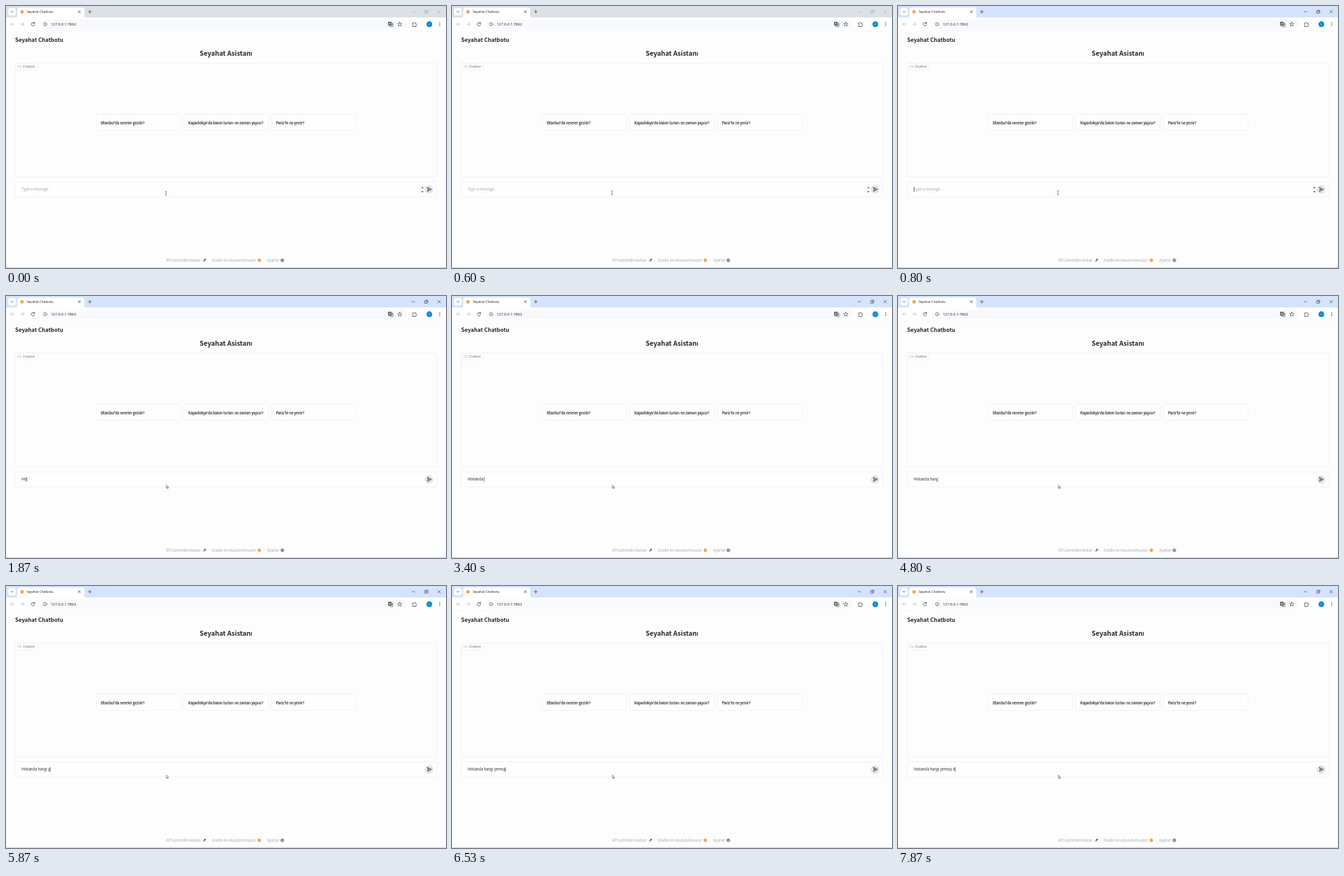
Write an HTML page that moves like this. It is 700 px wide and 416 px high and loops after 8000 ms.

```html
<!DOCTYPE html>
<html lang="tr">
<head>
<meta charset="utf-8">
<title>Seyahat Chatbotu</title>
<style>
  html, body { margin: 0; width: 100%; height: 100%; overflow: hidden; background: #fdfdfe; }
  svg { display: block; width: 700px; height: 416px; }
  text { font-family: "Noto Sans CJK JP", "Noto Sans CJK SC", "Open Sans", sans-serif; font-size: 5.73px; fill: #27272a; }
  .ui { font-family: "Open Sans", "Noto Sans", sans-serif; fill: #1f1f1f; }
  .bold { font-weight: 600; }
  .medium { stroke: #27272a; stroke-width: .16; }
  .soft { fill: #a6a6ae; }
  .box { fill: #fefefe; stroke: #efeff1; stroke-width: .8; }
  .line { fill: none; stroke: #3c4043; stroke-width: .8; stroke-linecap: round; stroke-linejoin: round; }
</style>
</head>
<body>
<svg viewBox="0 0 700 416" xmlns="http://www.w3.org/2000/svg">
  <rect width="700" height="416" fill="#fdfdfe"/>

  <!-- tab strip -->
  <rect id="strip" width="700" height="18.6"/>
  <rect x="3.5" y="3" width="12" height="12" rx="3.5" fill="#fff" fill-opacity=".92"/>
  <path class="line" d="M7.8 8.3l1.8 1.8 1.8-1.8"/>
  <path d="M14.5 18.6q3.5 0 3.5-3.5V6q0-3.5 3.5-3.5H121q3.5 0 3.5 3.5v9q0 3.5 3.5 3.5z" fill="#fff"/>
  <circle cx="25.5" cy="9.2" r="2.7" fill="#f7a545"/>
  <text class="ui" x="33" y="11.1" style="font-size:5.15px">Seyahat Chatbotu</text>
  <path class="line" d="M114.9 7.3l3.6 3.6m0-3.6l-3.6 3.6M130.9 9.1h4.8m-2.4-2.4v4.8"/>
  <g id="controls" class="line" style="stroke-width:.6">
    <path d="M646 9.1h4.2M686.9 6.9l4.4 4.4m0-4.4l-4.4 4.4"/>
    <path d="M666.3 7.9h3.6v3.6h-3.6zM667.5 7.8v-1.1h3.6v3.6h-1.1"/>
  </g>

  <!-- toolbar -->
  <rect y="18.4" width="700" height="20.8" fill="#fff"/>
  <rect x="54" y="21.6" width="584" height="14.6" rx="7.3" fill="#f8f9fc"/>
  <path class="line" d="M13.2 28.9H7.6m2.6-2.6l-2.6 2.6 2.6 2.6M23.2 28.9h5.6m-2.6-2.6l2.6 2.6-2.6 2.6" style="stroke:#b4b6b9"/>
  <path class="line" d="M45.1 27.4a2.7 2.7 0 1 0 .4 2.2M45.5 25.7v2h-2"/>
  <circle cx="62.2" cy="28.9" r="5.1" fill="#fff"/>
  <circle class="line" cx="62.2" cy="28.9" r="2.8" style="stroke-width:.6"/>
  <path class="line" d="M62.2 28.8v1.5M62.2 27.4v.1" style="stroke-width:.7"/>
  <text class="ui" x="71.2" y="31.1" style="font-size:5.96px">127.0.0.1:7862</text>
  <rect x="607.8" y="25.1" width="5.6" height="6.2" rx=".8" fill="#5b5f64"/>
  <path d="M609.2 29.7l1.4-3.3 1.4 3.3m-2.3-1h1.8" fill="none" stroke="#fff" stroke-width=".6"/>
  <path class="line" d="M614.2 27h1.4v5.8h-4.5l-.5-1.2M612.9 29.1h2m-.4 0q-.3 1.5-1.5 2.3" style="stroke-width:.6"/>
  <path id="star" class="line" style="stroke-width:.7"/>
  <path class="line" d="M646.9 27.1h1.7a.9.9 0 0 1 1.9 0h1.7v1.8a.9.9 0 0 1 0 1.9v1.7h-5.3v-1.7a1 1 0 0 0 0-1.9z"/>
  <circle cx="673.5" cy="28.9" r="4.6" fill="#0f8bcf"/>
  <text class="ui" x="673.5" y="30.2" text-anchor="middle" style="font-size:4.2px;fill:#fff">e</text>
  <g fill="#3c4043"><circle cx="690" cy="26.5" r=".75"/><circle cx="690" cy="28.9" r=".75"/><circle cx="690" cy="31.3" r=".75"/></g>
  <path d="M0 39.2h700" stroke="#f1f1f3" stroke-width=".6"/>

  <!-- page -->
  <text class="bold" x="14.6" y="56.7" style="font-size:8.71px">Seyahat Chatbotu</text>
  <text class="bold" x="350" y="78.9" text-anchor="middle" style="font-size:10.46px">Seyahat Asistanı</text>
  <rect class="box" x="14.5" y="90.5" width="671" height="181" rx="1.6" style="fill:#fdfdfe"/>
  <path class="box" d="M14.5 91v10.6H48q1.6 0 1.6-1.6v-9.5z"/>
  <path class="line" d="M19 94.5h3.6v2.6h-2.3l-.9.9v-.9H19zM23.2 95.3h.7v2.5h-1.6" style="stroke:#b5b5bb;stroke-width:.5"/>
  <text x="27" y="97.9" style="font-size:5.02px;fill:#6c6c75">Chatbot</text>
  <g id="chips"></g>

  <!-- message field -->
  <rect class="box" x="14.5" y="279.4" width="671" height="23.6" rx="1.6"/>
  <text id="hint" class="soft" x="25" y="293.3">Type a message...</text>
  <text id="typed" x="25" y="293.3"></text>
  <rect id="caret" y="287.6" width=".7" height="7.4" fill="#27272a"/>
  <path id="spin" d="M660.5 289.3l2-2.6 2 2.6zM660.5 294l2 2.6 2-2.6z" fill="#66666b"/>
  <circle cx="673" cy="291.2" r="6.8" fill="#e4e4e7"/>
  <path class="line" d="M670.5 288.1l6.3 3.1-6.3 3.1 1.1-3.1zM671.6 291.2h2.4" style="stroke:#27272a"/>

  <!-- footer -->
  <g>
    <text class="soft" x="254.8" y="405.8">API üzerinden kullan</text>
    <path d="M314.4 403.6q1.4-2.6 4-2.7 0 2.7-2.6 4.2z" fill="#55555c"/>
    <path d="M314.3 403.5l-1.4 1.2 1.2.2zM315.9 405.1l-.5 1.7 1.3-1.9z" fill="#4677b8"/>
    <path d="M314.2 405l-1.2 1.8 2-.9z" fill="#ef8a3c"/>
    <text class="soft" x="320" y="405.8">·</text>
    <text class="soft" x="327.2" y="405.8">Gradio ile oluşturulmuştur</text>
    <circle cx="403" cy="403.8" r="2.7" fill="#f7a545"/>
    <text class="soft" x="408.6" y="405.8">·</text>
    <text class="soft" x="415.6" y="405.8">Ayarlar</text>
    <circle cx="439.6" cy="403.8" r="2.5" fill="none" stroke="#5f6670" stroke-width="1" stroke-dasharray="1.3 .663"/>
    <circle cx="439.6" cy="403.8" r="1.5" fill="none" stroke="#5f6670" stroke-width="1.2"/>
  </g>
  <path d="M0 415.4h700" stroke="#c9c9cd" stroke-width=".9"/>

  <!-- pointers -->
  <path id="beam" d="M-1.3 -3.2q1 0 1.3.5q.3-.5 1.3-.5M0-2.7v5.4M-1.3 3.2q1 0 1.3-.5q.3.5 1.3.5" fill="none" stroke="#444" stroke-width=".65"/>
  <path id="arrow" d="M0 0v5.1l1.2-1.1.8 1.8.9-.4-.8-1.7h1.6z" fill="#fff" stroke="#333" stroke-width=".55" stroke-linejoin="round"/>
</svg>
<script>
const LOOP = 8000;
const MESSAGE = 'Hollanda hangi yemeği il';
// one time per typed letter
const KEYS = [1730, 1870, 2130, 2470, 2670, 2800, 2930, 3130, 3330, 3730, 3930, 4070,
  4200, 4870, 5070, 5870, 6000, 6200, 6330, 6470, 6670, 7470, 7600, 7730];
const FOCUS = 800;
const $ = id => document.getElementById(id);
const show = (id, on) => $(id).setAttribute('visibility', on ? 'visible' : 'hidden');
const place = (id, x, y) => $(id).setAttribute('transform', `translate(${x} ${y})`);
const ease = (t, a, b) => {
  const k = Math.min(1, Math.max(0, (t - a) / (b - a)));
  return k * k * (3 - 2 * k);
};

$('chips').innerHTML = [
  [143.5, "İstanbul'da nereler gezilir?"],
  [283, "Kapadokya'da balon turları ne zaman yapılır?"],
  [422.5, "Paris'te ne yenir?"]
].map(([x, label]) =>
  `<rect class="box" x="${x}" y="171.5" width="134.3" height="26" rx="2.6"/>` +
  `<text class="medium" x="${x + 7}" y="187.6">${label}</text>`).join('');

$('star').setAttribute('d', 'M' + Array.from({ length: 10 }, (_, i) => {
  const r = i % 2 ? 1.6 : 3.6, a = i * Math.PI / 5;
  return `${(626.4 + r * Math.sin(a)).toFixed(2)} ${(29.1 - r * Math.cos(a)).toFixed(2)}`;
}).join('L') + 'z');

let shown = -1, width = 0;

function draw(t) {
  const count = KEYS.filter(k => k <= t).length;
  const active = t >= FOCUS;
  $('strip').setAttribute('fill', active ? '#d5e3fc' : '#dce1e5');
  $('controls').style.stroke = active ? '#27272a' : '#a0a3a8';

  if (count !== shown) {
    $('typed').textContent = MESSAGE.slice(0, count).replace(/ /g, '\u00a0');
    width = count ? $('typed').getComputedTextLength() : 0;
    shown = count;
  }
  show('hint', !count);
  show('spin', !count);

  const blinkOff = (t >= 1330 && t < KEYS[0]) || (t >= 4730 && t < 4870);
  show('caret', active && !blinkOff);
  $('caret').setAttribute('x', 25 + width);

  const left = t >= 1200;
  show('beam', !left);
  show('arrow', left);
  place('beam', 254.6, 297.6 - ease(t, 270, 600) + 3 * ease(t, 1000, 1200));
  place('arrow', 255.1, 300.1);
}

const start = performance.now();
function tick() {
  draw((performance.now() - start) % LOOP);
  requestAnimationFrame(tick);
}
tick();
</script>
</body>
</html>
```
